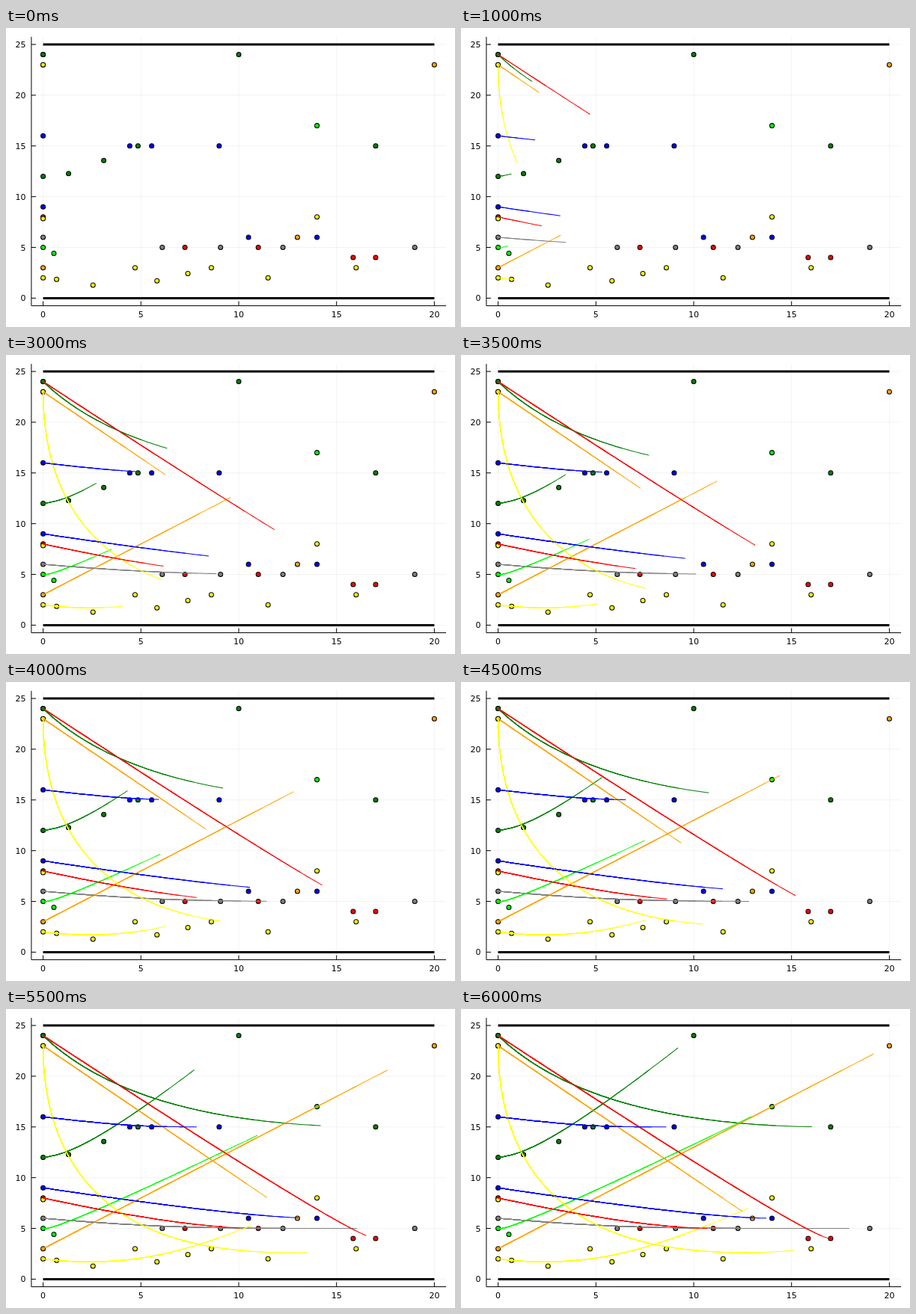
These frames come from a looping animation (600x400 px, 6500 ms). An HTML page with a canvas:

```html
<!DOCTYPE html>
<html lang="en">
<head>
<meta charset="utf-8">
<title>Bézier paths</title>
<style>
  html, body { margin: 0; width: 100%; height: 100%; overflow: hidden; background: #fff; }
  canvas { display: block; }
</style>
</head>
<body>
<canvas id="stage" width="600" height="400"></canvas>
<script>
const ctx = document.getElementById('stage').getContext('2d');
const STEP_MS = 500, STEPS = 13, STEP_T = 0.08;
const MAX_X = 20, MAX_Y = 25, TICK = 6;
// Just over one pixel, so that diagonals keep their full width instead of becoming hairlines.
const STROKE = 1.02;

const px = x => 49.6 + 26.14 * x;
const py = y => 361.4 - 13.575 * y;

// The axes leave a margin of 3% around the data.
const left = px(-0.03 * MAX_X), right = px(1.03 * MAX_X);
const bottom = py(-0.03 * MAX_Y), top_ = py(1.03 * MAX_Y);

// A Bézier path from the left edge through free control points.
const curve = (color, startY, ...controls) => ({ color, points: [[0, startY], ...controls] });

// A path whose later control points all lie on one lane; a single one gives a straight line.
const toLane = (color, startY, laneY, ...xs) => curve(color, startY, ...xs.map(x => [x, laneY]));

const paths = [
  curve('green', 12, [1.3, 12.28], [3.1, 13.57], [10, 24]),
  toLane('green', 24, 15, 4.85, 17),
  toLane('orange', 3, 23, 20),
  toLane('gray', 6, 5, 6.09, 9.07, 12.26, 19),
  curve('lime', 5, [0.55, 4.42], [14, 17]),
  curve('yellow', 23, [0, 7.83], [4.7, 3], [8.6, 3], [11.5, 2], [16, 3]),
  curve('yellow', 2, [0.69, 1.85], [2.55, 1.28], [5.82, 1.7], [7.4, 2.43], [14, 8]),
  toLane('orange', 23, 6, 13),
  toLane('red', 24, 4, 15.85, 17),
  toLane('red', 8, 5, 7.25, 11),
  toLane('blue', 9, 6, 10.5, 14),
  toLane('blue', 16, 15, 4.43, 5.55, 9)
];

function line(x1, y1, x2, y2, color = '#000', width = 1) {
  ctx.strokeStyle = color;
  ctx.lineWidth = width;
  ctx.beginPath();
  ctx.moveTo(x1, y1);
  ctx.lineTo(x2, y2);
  ctx.stroke();
}

function label(text, x, y, align) {
  ctx.textAlign = align;
  ctx.fillText(text, x, y);
}

function drawAxes() {
  const gridColor = 'rgba(0,0,0,0.1)';
  ctx.font = '11px "DejaVu Sans", sans-serif';
  ctx.fillStyle = '#000';
  for (let v = 0; v <= MAX_Y; v += 5) {
    const y = py(v);
    line(left, y, right, y, gridColor, 0.5);
    line(left, y, left + TICK, y);
    label(v, 26.5, y + 4, 'right');
  }
  for (let v = 0; v <= MAX_X; v += 5) {
    const x = px(v);
    line(x, top_, x, bottom, gridColor, 0.5);
    line(x, bottom, x, bottom - TICK);
    label(v, x, 387, 'center');
  }
  line(left, top_, left, bottom);
  line(left, bottom, right, bottom);
  for (const v of [0, MAX_Y]) line(px(0), py(v), px(MAX_X), py(v), '#000', 3);
}

function drawDot(color, [x, y]) {
  ctx.beginPath();
  ctx.arc(px(x), py(y), 3, 0, 2 * Math.PI);
  ctx.fillStyle = color;
  ctx.fill();
  ctx.strokeStyle = '#000';
  ctx.lineWidth = STROKE;
  ctx.stroke();
}

function bezier(points, t) {
  while (points.length > 1) {
    points = points.slice(1).map(([x, y], i) => {
      const [x0, y0] = points[i];
      return [x0 + (x - x0) * t, y0 + (y - y0) * t];
    });
  }
  return points[0];
}

function drawCurve({ color, points }, end) {
  ctx.strokeStyle = color;
  ctx.lineWidth = STROKE;
  ctx.beginPath();
  const count = Math.round(end * 100);
  for (let i = 0; i <= count; i++) {
    const [x, y] = bezier(points, i / 100);
    ctx.lineTo(px(x), py(y));
  }
  ctx.stroke();
}

function draw(step) {
  ctx.fillStyle = '#fff';
  ctx.fillRect(0, 0, 600, 400);
  drawAxes();
  for (const { color, points } of [...paths].reverse()) points.forEach(p => drawDot(color, p));
  // Overlaid strokes make the older parts of each path heavier.
  for (let k = 1; k <= step; k++) {
    for (const path of paths) drawCurve(path, k * STEP_T);
  }
}

let shown = -1;
function tick() {
  const step = Math.floor(performance.now() / STEP_MS) % STEPS;
  if (step !== shown) draw(shown = step);
  requestAnimationFrame(tick);
}
tick();
</script>
</body>
</html>
```
